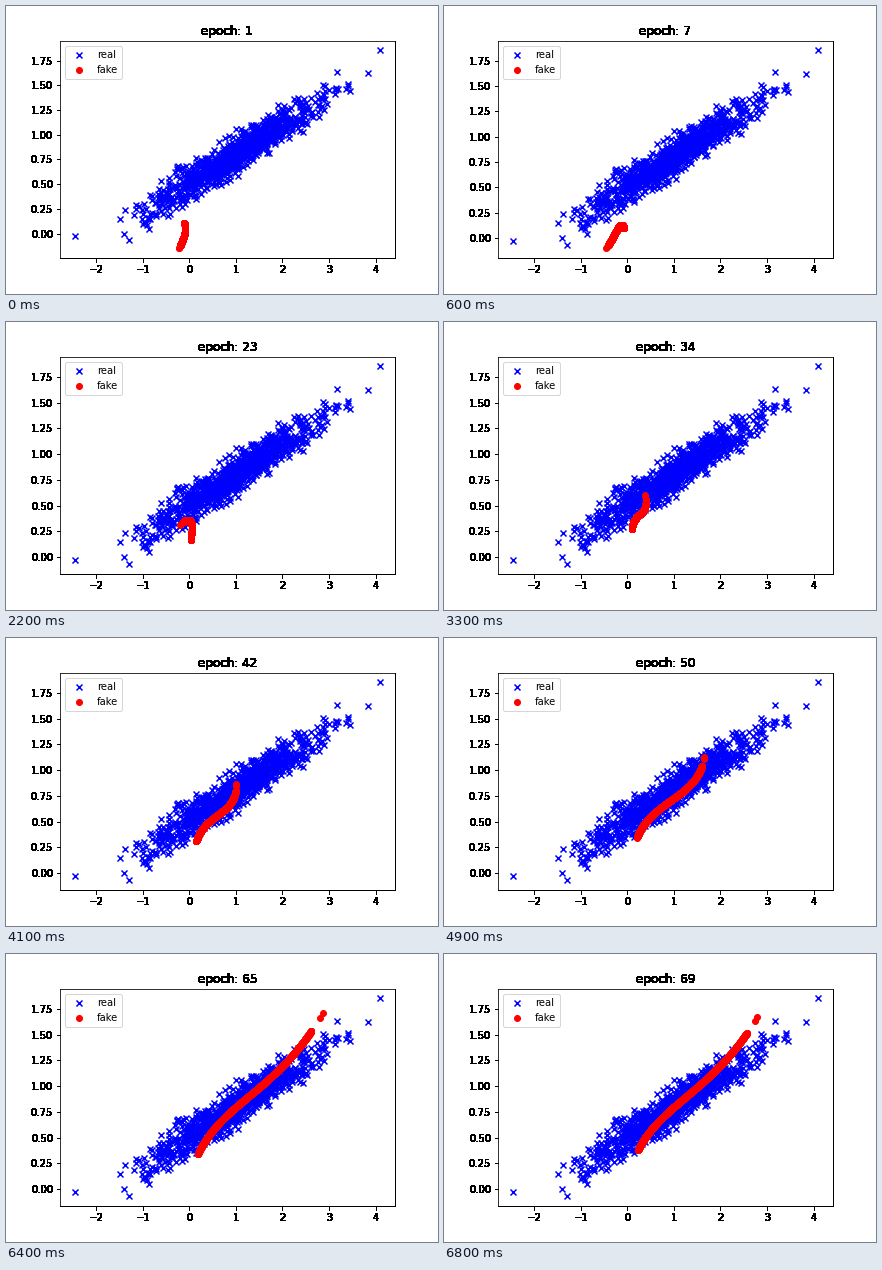
A matplotlib script for the animation above (6900 ms loop, 432 px wide and 288 px high).

```python
import numpy as np
import matplotlib.pyplot as plt
from matplotlib.animation import FuncAnimation

EPOCHS = 69
plt.rcParams.update({"font.family": "DejaVu Sans", "font.size": 10})


def to_data(points):
    """Convert stage pixels to plot units."""
    p = np.asarray(points, float)
    return np.stack([(p[..., 0] - 183.4) / 46.53, (235 - p[..., 1]) / 102.9], -1)


def solid(im, dpi):
    """Harden soft edges, as ink on a transparent margin."""
    im[..., :3] = 0
    im[..., 3] = im[..., 3] > 0
    return im, 0, 0


def make_real(n=1000):
    """Noisy line; the few fixed points set the extent of the axes."""
    rng = np.random.default_rng(7)
    z = rng.normal(size=n)
    x = 1.0 + 0.95 * z
    y = 0.51 + 0.295 * x + 0.085 * rng.normal(size=n)
    keep = (abs(z) < 2.7) & (y > -0.05)
    ends = to_data([(69.2, 238), (123, 242.1), (362, 68), (373.6, 44.4)])
    return np.vstack([np.stack([x, y], -1)[keep], ends])


# Generator output: one cubic Bezier per key epoch
KEYS = {
    1: [(178, 224), (182, 228), (177, 243), (172.5, 250.2)],
    7: [(180, 225), (176, 214), (172, 232), (162, 245.2)],
    15: [(184, 224.5), (183, 205), (170, 202), (159, 213)],
    23: [(185, 218), (186, 203), (188, 190), (174, 202.5)],
    34: [(187.5, 207), (191, 187), (205, 196), (201, 173)],
    50: [(193, 199.5), (208, 161), (254, 160), (260, 119)],
    59: [(195.5, 194.5), (209, 157), (275, 131), (289, 86)],
    63: [(190.5, 202.5), (217, 145), (270, 140), (318.5, 57)],
    69: [(194, 196), (216, 150), (272, 134), (313, 63)],
}
TIMES = list(KEYS)
CURVES = to_data(list(KEYS.values())).reshape(len(KEYS), -1)

# Dense along the curve, sparse at its far end
T = np.append(np.linspace(0, 0.92, 998), [0.98, 1])[:, None]
BEZIER = np.hstack([(1 - T)**3, 3 * T * (1 - T)**2, 3 * T**2 * (1 - T), T**3])


def fake_at(epoch):
    controls = [np.interp(epoch, TIMES, c) for c in CURVES.T]
    return BEZIER @ np.reshape(controls, (4, 2))


def padded(lo, hi):
    pad = 0.05 * (hi - lo)
    return lo - pad, hi + pad


real = make_real()
fig = plt.figure(figsize=(6, 4), dpi=72, facecolor="white")
ax = fig.add_axes([0.125, 0.125, 0.775, 0.755])
ax.scatter(*real.T, c="b", marker="x", label="real")
fake = ax.scatter([], [], c="r", marker="o", label="fake")
ax.legend(loc="upper left")
ax.set_xlim(*padded(real[:, 0].min(), real[:, 0].max()))
for part in (ax.xaxis, ax.yaxis, ax.title, ax.spines["right"], ax.spines["bottom"]):
    part.set_agg_filter(solid)


def draw(frame):
    epoch = frame + 1
    pts = fake_at(epoch)
    fake.set_offsets(pts)
    low = min(real[:, 1].min(), pts[:, 1].min())
    ax.set_ylim(*padded(low, real[:, 1].max()))
    ax.set_title(f"epoch: {epoch}", fontsize=12)
    return fake, ax.title


anim = FuncAnimation(fig, draw, frames=EPOCHS, interval=100, repeat=True, blit=False)
plt.show()
```
